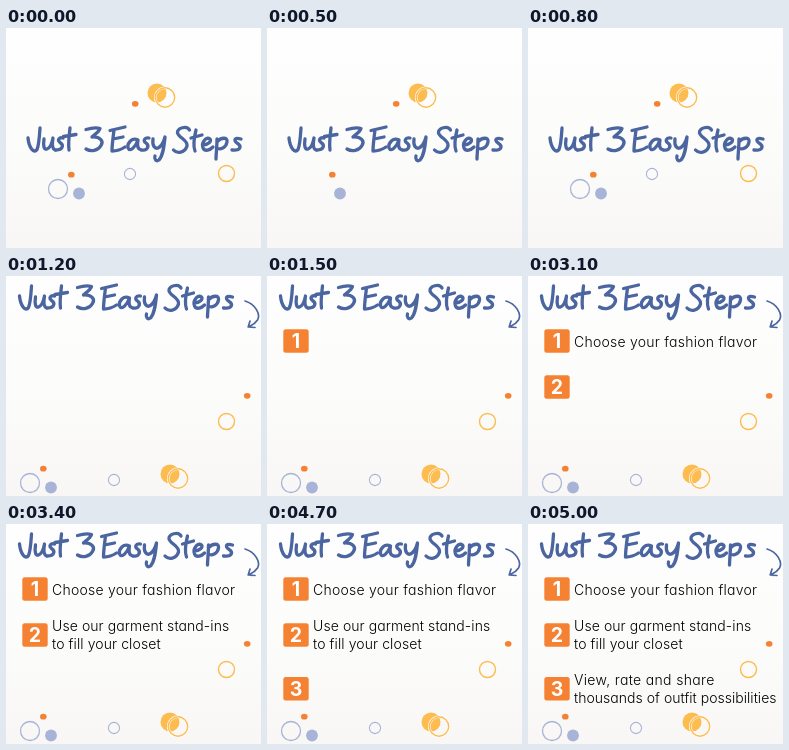
Animation, 255 px wide and 220 px high, one loop 10 s. Source, as an HTML page:

```html
<!DOCTYPE html>
<html lang="en">
<head>
<meta charset="utf-8">
<title>Just 3 Easy Steps</title>
<style>
  html, body { margin: 0; width: 100%; height: 100%; overflow: hidden; }
  body { background: linear-gradient(#fefefe, #fcfcfb 50%, #f8f7f5); }
  svg { display: block; width: 255px; height: 220px; }
  .pen { fill: none; stroke: #4a659f; stroke-linecap: round; stroke-linejoin: round; }
  .label { font: 300 14px Inter, "Open Sans", sans-serif; font-feature-settings: "cv11"; fill: #000; }
  .digit { font: bold 19.5px Inter, "Open Sans", sans-serif; fill: #fff; text-anchor: middle; }
</style>
</head>
<body>
<svg viewBox="0 0 255 220">
  <g id="bubbles"></g>
  <g id="title" class="pen" stroke-width="3.3" role="img" aria-label="Just 3 Easy Steps">
    <!-- Just -->
    <path d="M34 100C33.500 108 33 117 31 121.500C28 126 23 120 22 110"/>
    <path d="M38 111C37 118 38 122 41 121C44 120 46 115 47 110C46 116 46 121 49 122"/>
    <path d="M57 110C53 109 51 112 54 114.500C58 117 57 122 50 122"/>
    <path d="M64 100C63 108 62 116 63 122M57.500 108.500L70 106.500"/>
    <!-- 3 -->
    <path d="M80 101.500C85 100 91 99.500 94 100.500C93 104 88 107 86 109C94 108.500 98 113 95 117.500C92 123 85 124 80 121"/>
    <!-- Easy -->
    <path d="M108 102C107 110 106 117 106 123C111 123 116 121 119 119M104 102.500L119 99M107 111L117 109"/>
    <path d="M132 112C126 109 121 115 122 120C124 125 130 118 132 112C131 117 131 121 135 122"/>
    <path d="M143 110C138 109 137 113 140 115C144 118 141 123 136 122"/>
    <path d="M147 111C146 118 149 121 152 120C156 118 158 113 159 109C158 119 157 128 153 132C150 134 148 131 149 128"/>
    <!-- Steps -->
    <path d="M183.500 102C181 97 171 100 171.500 105C173 110 182 112 181 118C179 125 171 126 167.500 122"/>
    <path d="M190 102C188 110 187 118 189 123M185 110L196 107"/>
    <path d="M197 117C202 117 206 113 204 111C200 108 195 115 197 120C199 124 204 122 207 119"/>
    <path d="M211 111C211 119 210 126 210 131M211 114C215 109 222 109 221 114C220 120 214 122 211 120"/>
    <path d="M235 111C229 109 227 112 231 115C236 118 235 123 226 122"/>
  </g>
  <path id="arrow" class="pen" stroke-width="1.7"
    d="M239 25C249 28 255 38 251.500 44C249 48 246 49 243 50.500M244 45L242.200 51L249 51.500"/>
  <g id="steps"></g>
</svg>
<script>
const LOOP = 10000;
const MOVE = 1200;
const ORANGE = '#f58233', GOLD = '#fdbc50', BLUE = '#a8b4d7';

// Start and end centre, radius, colour, ring width (0 = disc), hidden span
const BUBBLES = [
  { from: [151, 65], to: [164, 198], r: 9.5, color: GOLD, ring: 0 },
  { from: [159, 69.5], to: [172, 202.5], r: 9.7, color: '#fefdfb', ring: 2.6 },
  { from: [159, 69.5], to: [172, 202.5], r: 9.7, color: GOLD, ring: 1.4 },
  { from: [220.5, 145.5], to: [220.5, 145.5], r: 8, color: GOLD, ring: 1.4, off: [500, 650] },
  { from: [52, 161], to: [24, 207], r: 9.5, color: BLUE, ring: 1.3, off: [500, 650] },
  { from: [124, 146], to: [108, 204], r: 5.6, color: BLUE, ring: 1.1, off: [500, 650] },
  { from: [73, 165.5], to: [45, 211.5], r: 5.9, color: BLUE, ring: 0, off: [650, 800] },
  { from: [65.3, 146.7], to: [37.3, 192.7], r: 3.3, flat: 0.87, color: ORANGE, ring: 0, off: [650, 800] },
  { from: [129.2, 75.8], to: [241.2, 119.8], r: 3.3, flat: 0.87, color: ORANGE, ring: 0, off: [650, 800] }
];

// Lines: text, baseline, tracking
const STEPS = [
  { y: 53.2, badgeAt: 1500, textAt: 1800, lines: [['Choose your fashion flavor', 71, 0.25]] },
  { y: 99.2, badgeAt: 3100, textAt: 3400,
    lines: [['Use our garment stand-ins', 107, 0.08], ['to fill your closet', 125, 0.1]] },
  { y: 153, badgeAt: 4700, textAt: 5000,
    lines: [['View, rate and share', 161, 0.33], ['thousands of outfit possibilities', 179, 0.03]] }
];

const byId = id => document.getElementById(id);

function add(parent, tag, attrs = {}, text = '') {
  const el = document.createElementNS('http://www.w3.org/2000/svg', tag);
  for (const key in attrs) el.setAttribute(key, attrs[key]);
  el.textContent = text;
  return parent.appendChild(el);
}

const show = (el, on) => { el.style.visibility = on ? 'visible' : 'hidden'; };

for (const b of BUBBLES) {
  const paint = b.ring
    ? { fill: 'none', stroke: b.color, 'stroke-width': b.ring }
    : { fill: b.color };
  b.el = add(byId('bubbles'), 'ellipse', { rx: b.r, ry: b.r * (b.flat || 1), ...paint });
}

STEPS.forEach((s, i) => {
  s.badge = add(byId('steps'), 'g');
  add(s.badge, 'rect', { x: 16.3, y: s.y, width: 25.4, height: 23.6, rx: 2.5, fill: ORANGE });
  add(s.badge, 'text', { x: 29, y: s.y + 19, class: 'digit' }, i + 1);
  s.text = add(byId('steps'), 'g');
  for (const [text, y, tracking] of s.lines) {
    add(s.text, 'text', { x: 46, y, class: 'label', 'letter-spacing': tracking }, text);
  }
});

function draw(t) {
  const moved = t >= MOVE;
  byId('title').setAttribute('transform', moved ? 'translate(-8.500 -90)' : '');
  show(byId('arrow'), moved);
  for (const b of BUBBLES) {
    const [x, y] = moved ? b.to : b.from;
    b.el.setAttribute('cx', x);
    b.el.setAttribute('cy', y);
    show(b.el, !(b.off && t >= b.off[0] && t < b.off[1]));
  }
  for (const s of STEPS) {
    show(s.badge, t >= s.badgeAt);
    show(s.text, t >= s.textAt);
  }
}

const start = performance.now();
function tick() {
  draw((performance.now() - start) % LOOP);
  requestAnimationFrame(tick);
}
tick();
</script>
</body>
</html>
```
